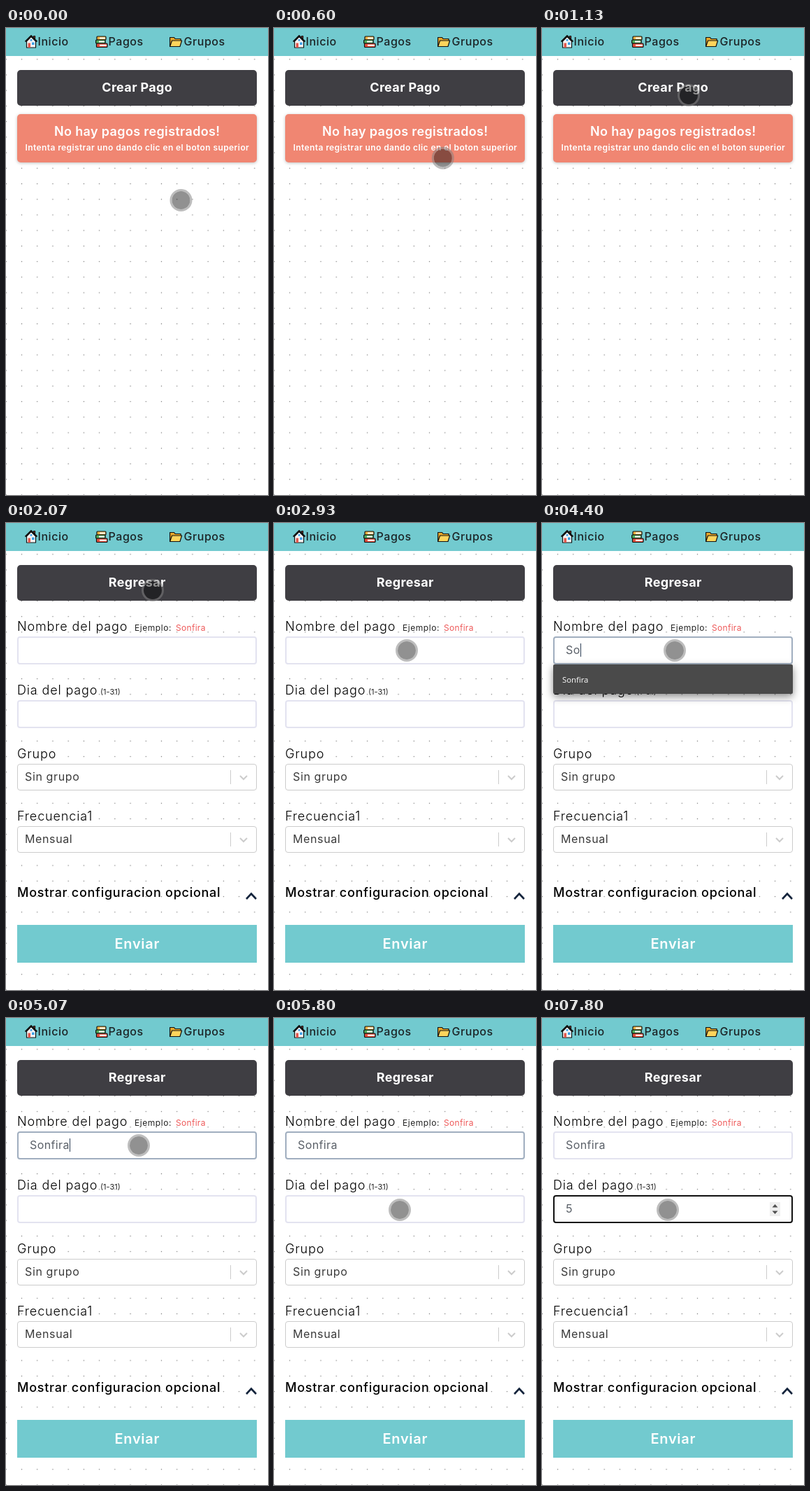
These frames come from a looping animation (375 px wide and 667 px high, 8000 ms). An HTML page:

```html
<!DOCTYPE html>
<html lang="es">
<head>
<meta charset="utf-8">
<title>Pagos</title>
<style>
  html, body { margin: 0; width: 100%; height: 100%; overflow: hidden; background: #fff; }
  svg { display: block; width: 100%; height: 100%; }
  text { font-family: Inter, "Open Sans", sans-serif; white-space: pre; }
  .mid { text-anchor: middle; }
  .nav { font-size: 16px; font-weight: 500; letter-spacing: .55px; fill: #1c2426; }
  .btn { font-size: 18px; font-weight: 700; letter-spacing: .35px; fill: #fff; }
  .head { font-size: 18px; font-weight: 600; letter-spacing: .36px; fill: #fff; }
  .sub { font-size: 12px; font-weight: 600; letter-spacing: .4px; fill: #fff; }
  .label { font-size: 18px; font-weight: 300; letter-spacing: .85px; fill: #000; }
  .hint { font-size: 12px; letter-spacing: .55px; fill: #222; }
  .red { fill: #ee5a5a; letter-spacing: .3px; }
  .range { font-size: 11px; fill: #222; }
  .value { font-size: 16px; letter-spacing: .62px; fill: #3a3a3a; }
  .typed { font-size: 16px; letter-spacing: .4px; fill: #5a6068; }
  .more { font-size: 18px; font-weight: 500; letter-spacing: .73px; fill: #000; }
  .send { font-size: 20px; font-weight: 600; letter-spacing: .7px; fill: #fff; }
  .option { font: 11.3px "Open Sans", "Noto Sans", sans-serif; fill: #fff; }
  .field { fill: #fff; stroke: #e3e3f0; stroke-width: 2; }
  .select { fill: #fff; stroke: #ccc; }
  .line { fill: none; stroke: #ccc; }
  .ink { stroke: #111; stroke-width: 1.2; stroke-linejoin: round; }
  #list rect { fill: #4a4a4a; filter: drop-shadow(0 4px 6px rgba(0, 0, 0, .45)); }
  .card { fill: #f08672; filter: drop-shadow(0 1px 2px rgba(0, 0, 0, .25)); }
</style>
</head>
<body>
<svg viewBox="0 0 375 667">
  <defs>
    <pattern id="dots" x="-10.8" y="-10.8" width="22.22" height="22.22" patternUnits="userSpaceOnUse">
      <circle cx="11.11" cy="11.11" r=".7" fill="#777"/>
    </pattern>
  </defs>
  <rect width="375" height="667" fill="#fff"/>
  <rect width="375" height="667" fill="url(#dots)"/>

  <rect width="375" height="40" fill="#72cacf"/>
  <g class="ink">
    <path d="M29.5 19v9h13v-9l-6.500-6.500z" fill="#f4f4f4"/>
    <path d="M39.500 11.500h2v4l-2-2z" fill="#e2574c"/>
    <path d="M27.500 19.500L36 11l8.500 8.500" fill="none" stroke-width="1.800"/>
    <rect x="31.500" y="21.500" width="3.500" height="6.500" fill="#e2574c" stroke="none"/>
    <rect x="37" y="20.500" width="3.500" height="3.500" fill="#3aa0e8" stroke="none"/>
    <rect x="34.700" y="16" width="2.600" height="2.600" fill="#3aa0e8" stroke="none"/>
  </g>
  <g class="ink">
    <rect x="130" y="12" width="13" height="5" rx="1" fill="#f5b440"/>
    <rect x="128.600" y="17" width="13.500" height="5" rx="1" fill="#4fae5b"/>
    <rect x="129.500" y="22" width="15.500" height="5.500" rx="1" fill="#e4503f"/>
    <path d="M134 14.500h8M133 19.500h8M134 24.800h10" stroke="#fff" stroke-width="2"/>
  </g>
  <g class="ink">
    <path d="M234.600 26.500v-13h6l1.500 2h8v3" fill="#e9a92c"/>
    <path d="M234.600 26.500l3-8.500h14l-2.600 8.500z" fill="#ffd45c"/>
  </g>
  <text class="nav" x="45.500" y="25">Inicio</text>
  <text class="nav" x="146.500" y="25">Pagos</text>
  <text class="nav" x="254.500" y="25">Grupos</text>

  <rect x="16" y="60" width="343" height="51" rx="5" fill="#3f3e43"/>
  <text class="btn mid" id="action" x="187.700" y="91"></text>

  <g id="empty">
    <rect class="card" x="16" y="123" width="343" height="69" rx="5"/>
    <text class="head mid" x="187.700" y="154">No hay pagos registrados!</text>
    <text class="sub mid" x="187.900" y="175">Intenta registrar uno dando clic en el boton superior</text>
  </g>

  <g id="form">
    <text class="label" x="16" y="154">Nombre del pago</text>
    <text class="hint" x="184" y="154">Ejemplo:</text>
    <text class="hint red" x="243" y="154">Sonfira</text>
    <rect class="field" id="nameBox" x="17" y="163" width="341" height="38" rx="3"/>
    <text class="typed" id="name" x="34" y="187"></text>

    <text class="label" x="16" y="245">Dia del pago</text>
    <text class="range" x="135" y="245">(1-31)</text>
    <rect class="field" id="dayBox" x="17" y="254" width="341" height="38" rx="3"/>
    <text class="typed" id="day" x="34" y="278"></text>
    <g id="spin">
      <rect x="326" y="263" width="15" height="20" fill="#efefef"/>
      <path d="M329.500 270.500h8l-4-4.500zM329.500 275.500h8l-4 4.500z" fill="#505050"/>
    </g>

    <text class="label" x="16" y="336">Grupo</text>
    <rect class="select" x="16.500" y="344.500" width="342" height="37" rx="3.500"/>
    <text class="value" x="27" y="368">Sin grupo</text>
    <path class="line" d="M321.500 353v20"/>
    <path class="line" stroke-width="2" d="M335 361l5 5 5-5"/>

    <text class="label" x="16" y="425">Frecuencia1</text>
    <rect class="select" x="16.500" y="433.500" width="342" height="37" rx="3.500"/>
    <text class="value" x="27" y="457">Mensual</text>
    <path class="line" d="M321.500 442v20"/>
    <path class="line" stroke-width="2" d="M335 450l5 5 5-5"/>

    <text class="more" x="16" y="534">Mostrar configuracion opcional</text>
    <path id="fold" d="M344 537l7-7.500 7 7.500" fill="none" stroke="#14243c" stroke-width="2.600"/>
    <rect x="16" y="574" width="343" height="54" fill="#72cacf"/>
    <text class="send mid" x="187.800" y="608">Enviar</text>

    <g id="list"><rect x="16" y="202" width="343" rx="2"/></g>
    <rect id="caret" width="1" height="19" fill="#2d3f55"/>
  </g>

  <g id="pointer">
    <circle r="13" fill="#000" fill-opacity=".43"/>
    <circle r="14.500" fill="none" stroke="#808080" stroke-opacity=".52" stroke-width="3"/>
  </g>
</svg>
<script>
const LOOP = 8000, STEP = 1000 / 15, BLINK = 530;
const $ = id => document.getElementById(id);
const show = (id, on) => $(id).style.display = on ? '' : 'none';
const setText = (id, s) => { if ($(id).textContent !== s) $(id).textContent = s; };

const NAME = 'Sonfira';
const nameKeys = [4270, 4400, 4470, 4730, 4870, 4930, 5070];
const dayKeys = [7270];

// start, end, from, bend, to
const moves = [
  [67, 267, [250.5, 246], [245, 219], [240, 193]],
  [467, 1133, [240, 193], [253, 150], [210, 96]],
  [2267, 2933, [210, 96], [202, 140], [190, 182]],
  [5533, 5800, [190, 182], [186, 228], [180, 274]]
];

const options = ['Entretenimiento', NAME, 'Perroman', 'EPALE', 'Gastos básicos', 'A'].map(s => {
  const el = document.createElementNS('http://www.w3.org/2000/svg', 'text');
  el.setAttribute('class', 'option');
  el.setAttribute('x', 29);
  el.textContent = s;
  return $('list').appendChild(el);
});

const ease = p => p < .5 ? 2 * p * p : 1 - 2 * (1 - p) * (1 - p);
const typedCount = (keys, t) => keys.filter(k => t >= k).length;

function pointerAt(t) {
  const [start, end, a, b, c] = moves.filter(m => t >= m[0]).pop() || moves[0];
  const p = ease(Math.min(1, Math.max(0, (t - start) / (end - start)))), q = 1 - p;
  return a.map((v, i) => q * q * v + 2 * p * q * b[i] + p * p * c[i]);
}

function drawList(filtered) {
  $('list').firstElementChild.setAttribute('height', filtered ? 42 : 212);
  let row = 0;
  for (const el of options) {
    const on = !filtered || el.textContent === NAME;
    el.style.display = on ? '' : 'none';
    if (on) el.setAttribute('y', 228 + 34 * row++);
  }
}

function drawCaret(t, onDay) {
  const keys = onDay ? dayKeys : nameKeys;
  const last = Math.max(onDay ? 6130 : 4000, ...keys.filter(k => t >= k));
  const field = $(onDay ? 'day' : 'name');
  const width = field.textContent ? field.getComputedTextLength() : 0;
  $('caret').setAttribute('x', Math.round(34 + width));
  $('caret').setAttribute('y', onDay ? 264 : 172);
  show('caret', t >= 4000 && Math.floor((t - last) / BLINK) % 2 === 0);
}

function draw(ms) {
  // the picture advances at 15 steps per second
  const t = Math.floor((ms + 4) / STEP) * STEP + 4;
  const inForm = t >= 1730, onDay = t >= 6130, count = typedCount(nameKeys, t);

  setText('action', inForm ? 'Regresar' : 'Crear Pago');
  show('empty', !inForm);
  show('form', inForm);
  show('fold', t >= 2070);

  setText('name', NAME.slice(0, count));
  setText('day', '5'.slice(0, typedCount(dayKeys, t)));
  $('nameBox').style.stroke = t >= 4000 && !onDay ? '#a0aebf' : '';
  $('dayBox').style.stroke = onDay ? '#101010' : '';
  show('spin', onDay);
  show('list', t >= 4000 && t < 5070);
  drawList(count > 0);
  drawCaret(t, onDay);

  const [x, y] = pointerAt(t);
  $('pointer').setAttribute('transform', `translate(${x.toFixed(2)} ${y.toFixed(2)})`);
}

const began = performance.now();
function tick() {
  draw((performance.now() - began) % LOOP);
  requestAnimationFrame(tick);
}
tick();
</script>
</body>
</html>
```
